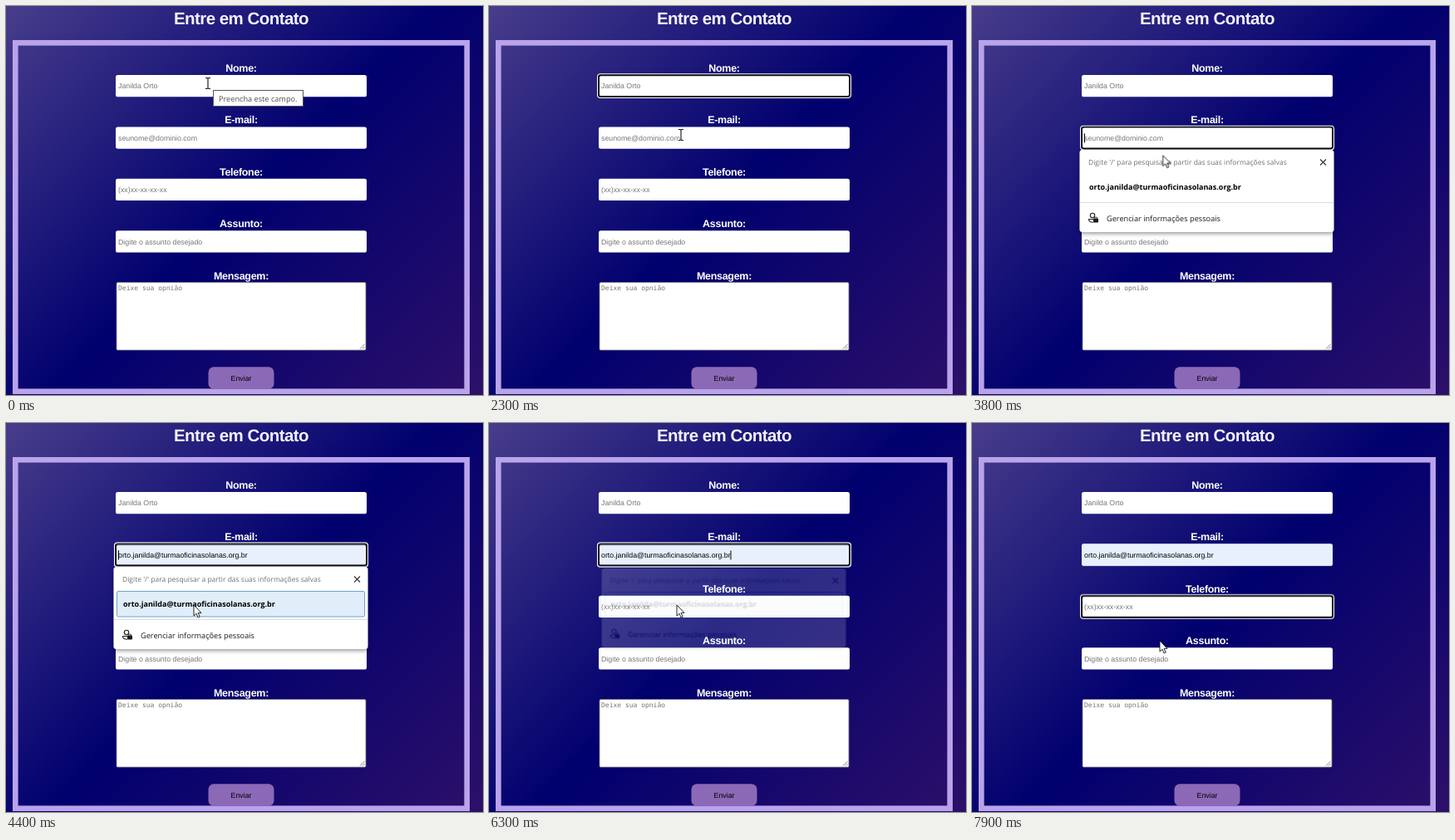
These frames come from a looping animation (574x468 px, 8000 ms). An HTML page:

```html
<!DOCTYPE html>
<html lang="pt-BR">
<head>
<meta charset="utf-8">
<title>Entre em Contato</title>
<style>
html, body { margin: 0; width: 100%; height: 100%; overflow: hidden; }
body { background: linear-gradient(135deg, #483d8b 0%, #00006e 50%, #2d1069 100%); }
svg { display: block; width: 574px; height: 468px; }
text { font: 8.8px "Liberation Sans", Arial, sans-serif; text-rendering: geometricPrecision; }
.title, .label text { font-weight: bold; fill: #f4f1fb; text-anchor: middle; }
.title { font-size: 20.5px; letter-spacing: -.55px; }
.label text { font-size: 12.5px; letter-spacing: -.3px; fill: #fff; }
.hint { fill: #757575; }
.mono { font: 8px "DejaVu Sans Mono", monospace; }
.ui text { font: 9.2px "Open Sans", sans-serif; fill: #1b1b1b; }
.ui .small { font-size: 8.5px; fill: #707070; }
.ui .bold { font-size: 9px; font-weight: 700; fill: #000; }

/* One loop is 8 s, so 1.25% is a tenth of a second. */
.anim { animation: 8s step-end infinite; }
#tip { animation-name: tip; }
#nameFocus { animation-name: name-focus; }
#mailFocus { animation-name: mail-focus; }
#telFocus { animation-name: tel-focus; }
#nameCaret { animation-name: name-caret; }
#startCaret { animation-name: start-caret; }
#endCaret { animation-name: end-caret; }
#telCaret { animation-name: tel-caret; }
#mailHint { animation-name: until-hover; }
.filled { animation-name: from-hover; }
#menu { animation-name: menu; transform-origin: 282.5px 223px; }
#pointer { animation-name: travel; }
#beam { animation-name: beam; }
#arrow { animation-name: arrow; }

@keyframes tip { 0% { opacity: 1 } 1.25% { opacity: .65 } 2.5% { opacity: .3 } 3.75%, 100% { opacity: 0 } }
@keyframes name-focus { 0%, 32.5%, 100% { opacity: 0 } 7.5% { opacity: 1 } }
@keyframes mail-focus { 0%, 90%, 100% { opacity: 0 } 32.5% { opacity: 1 } }
@keyframes tel-focus { 0% { opacity: 0 } 90%, 100% { opacity: 1 } }
@keyframes name-caret { 0%, 13.75%, 27.5%, 100% { opacity: 0 } 7.5%, 20% { opacity: 1 } }
@keyframes start-caret {
  0%, 38.75%, 51.25%, 66.25%, 77.5%, 100% { opacity: 0 }
  32.5%, 45%, 55%, 72.5% { opacity: 1 }
}
@keyframes end-caret { 0%, 81.25%, 90%, 100% { opacity: 0 } 77.5%, 88.75% { opacity: 1 } }
@keyframes tel-caret { 0%, 96.25%, 100% { opacity: 0 } 90% { opacity: 1 } }
@keyframes until-hover { 0% { opacity: 1 } 51.25%, 100% { opacity: 0 } }
@keyframes from-hover { 0% { opacity: 0 } 51.25%, 100% { opacity: 1 } }
@keyframes menu {
  0%, 80%, 100% { opacity: 0; transform: scale(.96) }
  33.75% { opacity: .5; transform: scale(.98) }
  35% { opacity: 1; transform: none }
  77.5% { opacity: .6; transform: scale(.98) }
  78.75% { opacity: .17; transform: scale(.96) }
}
@keyframes travel {
  0% { transform: translate(243px, 93px) }
  1.25% { transform: translate(243px, 94px) }
  15% { transform: translate(243px, 94px); animation-timing-function: steps(3) }
  18.75% { transform: translate(234px, 125px); animation-timing-function: steps(3) }
  22.5% { transform: translate(229px, 149px) }
  25% { transform: translate(229px, 151px) }
  27.5% { transform: translate(230px, 153px) }
  28.75% { transform: translate(231px, 155px) }
  45% { transform: translate(231px, 155px); animation-timing-function: steps(3) }
  48.75% { transform: translate(229px, 192px); animation-timing-function: steps(4) }
  53.75% { transform: translate(226px, 219px) }
  93.75% { transform: translate(226px, 219px); animation-timing-function: steps(4) }
  98.75%, 100% { transform: translate(226px, 262px) }
}
@keyframes beam { 0%, 81.25% { opacity: 1 } 47.5%, 96.25%, 100% { opacity: 0 } }
@keyframes arrow { 0%, 81.25% { opacity: 0 } 47.5%, 96.25%, 100% { opacity: 1 } }
</style>
</head>
<body>
<svg viewBox="0 0 574 468">
  <defs>
    <rect id="field" x="132" y="83" width="302" height="26.3" rx="2.6"/>
    <g id="ring">
      <rect x="130" y="81.3" width="306" height="29.7" rx="4" fill="#fff"/>
      <rect x="131" y="82.3" width="304" height="27.7" rx="3.3" fill="#0b0b12"/>
      <rect x="133" y="84.2" width="300" height="23.9" rx="1.6"/>
    </g>
    <path id="caret" d="M135.5 91v11" stroke="#000"/>
    <path id="ibeam" d="M-3-6.5h2L0-5.8l1-.7h2M0-5.8V5.8M-3 6.5h2L0 5.8l1 .7h2" fill="none"/>
    <filter id="shadow" x="-10%" y="-10%" width="120%" height="130%">
      <feDropShadow dx="0" dy="2" stdDeviation="2.5" flood-opacity=".4"/>
    </filter>
  </defs>

  <text class="title" x="283" y="22.3">Entre em Contato</text>
  <rect x="11.3" y="44.3" width="543.4" height="419.4" fill="none" stroke="#b9a3ea" stroke-width="6.6"/>

  <g class="label">
    <text x="283" y="79">Nome:</text>
    <text x="283" y="141.4">E-mail:</text>
    <text x="283" y="203.8">Telefone:</text>
    <text x="283" y="266.2">Assunto:</text>
    <text x="283" y="328.6">Mensagem:</text>
  </g>

  <g fill="#fff">
    <use href="#field"/>
    <use href="#field" y="62.4"/>
    <use href="#field" y="124.8"/>
    <use href="#field" y="187.2"/>
    <use id="nameFocus" class="anim" href="#ring"/>
    <use id="telFocus" class="anim" href="#ring" y="124.8"/>
  </g>
  <use class="anim filled" href="#field" y="62.4" fill="#e8f0fe"/>
  <g id="mailFocus" class="anim">
    <use href="#ring" y="62.4" fill="#fff"/>
    <use class="anim filled" href="#ring" y="62.4" fill="#e8f0fe"/>
  </g>

  <text class="hint" x="135" y="99.3">Janilda Orto</text>
  <text class="hint anim" id="mailHint" x="135" y="161.7">seunome@dominio.com</text>
  <text class="anim filled" x="135" y="161.7">orto.janilda@turmaoficinasolanas.org.br</text>
  <text class="hint" x="135" y="224.1">(xx)xx-xx-xx-xx</text>
  <text class="hint" x="135" y="286.5">Digite o assunto desejado</text>

  <use id="nameCaret" class="anim" href="#caret"/>
  <use id="startCaret" class="anim" href="#caret" y="62.4"/>
  <use id="endCaret" class="anim" href="#caret" x="155.5" y="62.4"/>
  <use id="telCaret" class="anim" href="#caret" y="124.8"/>

  <rect x="133" y="332.5" width="300" height="81.5" rx="1.5" fill="#fff" stroke="#77777f" stroke-width=".8"/>
  <path d="M426 412.5l5.5-5.5M429 412.5l2.5-2.5" stroke="#666" stroke-width=".8"/>
  <text class="hint mono" x="135" y="342">Deixe sua opnião</text>

  <rect x="243.5" y="434.3" width="79" height="26.4" rx="6.5" fill="#8b69b6"/>
  <text x="283" y="450.8" text-anchor="middle">Enviar</text>

  <g id="tip" class="anim ui">
    <rect x="249.5" y="101.5" width="108" height="19" fill="#fff" stroke="#55555f"/>
    <text x="256" y="114.7" style="fill:#505050">Preencha este campo.</text>
  </g>

  <g id="menu" class="anim ui">
    <rect x="129.5" y="173" width="306" height="99" rx="3.5" fill="#fff" filter="url(#shadow)"/>
    <text class="small" x="140" y="191">Digite '/' para pesquisar a partir das suas informações salvas</text>
    <path d="M419 184.5l7 7m0-7l-7 7" stroke="#333" stroke-width="1.1"/>
    <rect class="anim filled" x="133.5" y="202.5" width="298" height="30.5" rx="1.5" fill="#e0eefa" stroke="#6ba3cc"/>
    <text class="bold" x="141" y="220.8">orto.janilda@turmaoficinasolanas.org.br</text>
    <path d="M130 236.5h305" stroke="#dcdcdc"/>
    <g fill="none" stroke="#222" stroke-width="1.1">
      <circle cx="145" cy="252" r="2.7"/>
      <path d="M146 260.3c-3.500 0-5.500-1-5.500-3.800h5.500"/>
    </g>
    <rect x="146" y="255.500" width="6" height="5" rx=".8" fill="#1b1b1b"/>
    <path d="M147.600 255.500v-1.300h2.800v1.300" fill="none" stroke="#1b1b1b" stroke-width=".8"/>
    <text x="162" y="258.500">Gerenciar informações pessoais</text>
  </g>

  <g id="pointer" class="anim">
    <g id="beam" class="anim">
      <use href="#ibeam" stroke="#fff" stroke-width="2.400"/>
      <use href="#ibeam" stroke="#111" stroke-width="1.100"/>
    </g>
    <path id="arrow" class="anim" d="M0 0v13l3-2.800L5.100 15l2.100-1-2.100-4.600H9z" fill="#fff" stroke="#111" stroke-width=".9"/>
  </g>
</svg>
</body>
</html>
```
